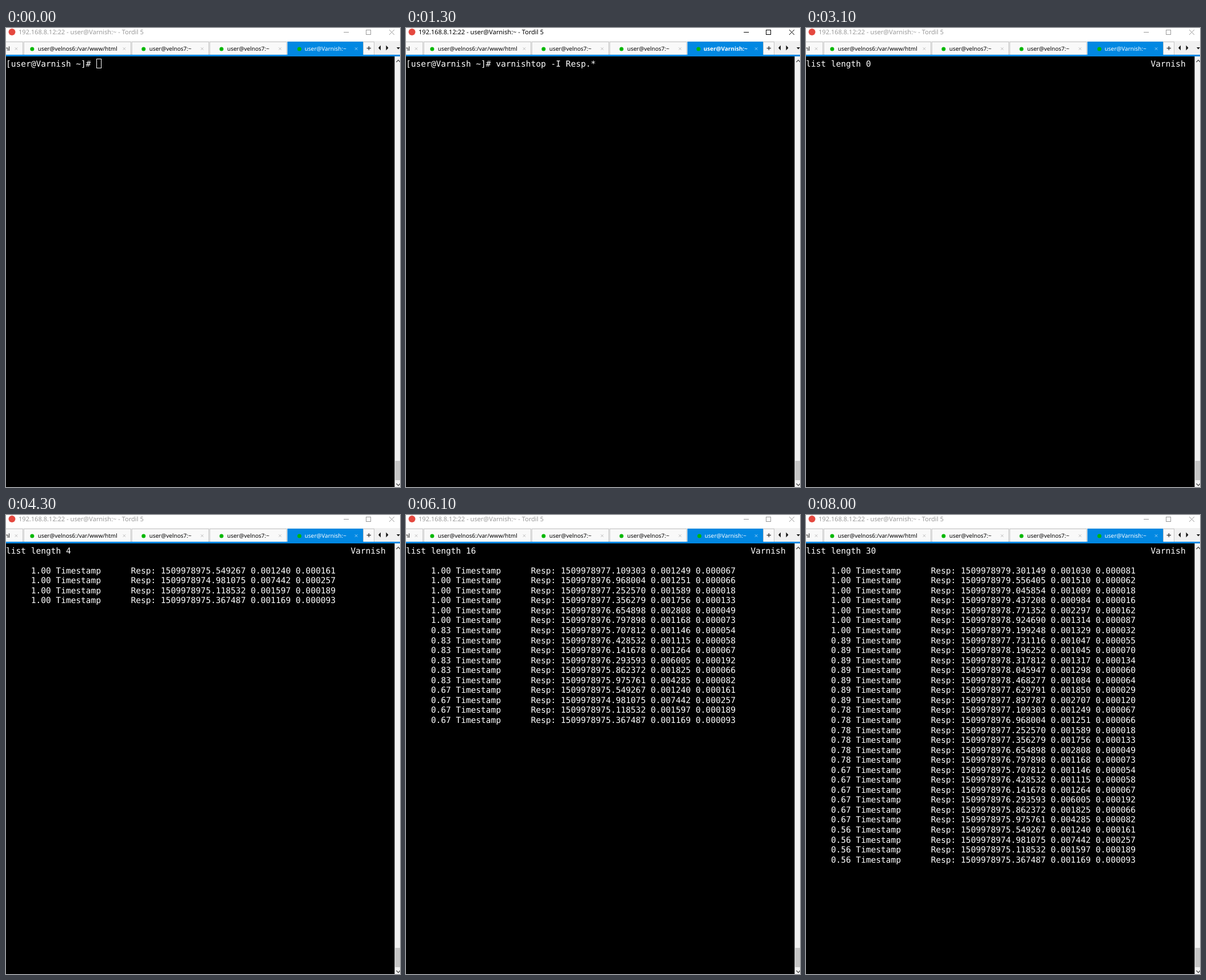
An HTML page with a canvas for the animation above (8.7 s loop, 693 by 808 pixels).

```html
<!DOCTYPE html>
<html lang="en">
<head>
<meta charset="utf-8">
<title>Terminal session</title>
<style>
  html, body { margin: 0; width: 100%; height: 100%; overflow: hidden; background: #000; }
  canvas { display: block; }
</style>
</head>
<body>
<canvas id="stage" width="693" height="808"></canvas>
<script>
const ctx = document.getElementById('stage').getContext('2d');
ctx.textRendering = 'geometricPrecision';

const LOOP = 8700;
const CELL = 8.785, LINE = 17.55, BASE = 67.6;
const UI = '"Noto Sans", sans-serif';
const MONO = '14.6px "DejaVu Sans Mono", monospace';
const BLUE = '#0288e2';
const PROMPT = '[user@Varnish ~]# ';

// Entries that arrive together: seconds, time since start, time since last.
const batches = [
  ['75.549267 1240 161', '74.981075 7442 257', '75.118532 1597 189', '75.367487 1169 93'],
  ['75.707812 1146 54', '76.428532 1115 58', '76.141678 1264 67',
   '76.293593 6005 192', '75.862372 1825 66', '75.975761 4285 82'],
  ['77.109303 1249 67', '76.968004 1251 66', '77.252570 1589 18',
   '77.356279 1756 133', '76.654898 2808 49', '76.797898 1168 73'],
  ['77.731116 1047 55', '78.196252 1045 70', '78.317812 1317 134', '78.045947 1298 60',
   '78.468277 1084 64', '77.629791 1850 29', '77.897787 2707 120'],
  ['79.301149 1030 81', '79.556405 1510 62', '79.045854 1009 18', '79.437208 984 16',
   '78.771352 2297 162', '78.924690 1314 87', '79.199248 1329 32']
];
const arrivals = [4300, 5200, 6100, 7100, 8000];

function rect(x, y, w, h, color) {
  ctx.fillStyle = color;
  ctx.fillRect(x, y, w, h);
}

function label(text, x, y, font, color, align = 'left') {
  ctx.font = font;
  ctx.fillStyle = color;
  ctx.textAlign = align;
  ctx.fillText(text, x, y);
}

function dot(x, y, r, color) {
  ctx.fillStyle = color;
  ctx.beginPath();
  ctx.arc(x, y, r, 0, 2 * Math.PI);
  ctx.fill();
}

function line(points, color, width = 1) {
  ctx.strokeStyle = color;
  ctx.lineWidth = width;
  ctx.beginPath();
  points.forEach(([x, y]) => ctx.lineTo(x, y));
  ctx.stroke();
}

function triangle(points, color) {
  ctx.fillStyle = color;
  ctx.beginPath();
  points.forEach(([x, y]) => ctx.lineTo(x, y));
  ctx.fill();
}

function cross(x, y, r, color, width) {
  line([[x - r, y - r], [x + r, y + r]], color, width);
  line([[x + r, y - r], [x - r, y + r]], color, width);
}

function termText(text, col, row) {
  ctx.font = MONO;
  ctx.fillStyle = '#fff';
  ctx.textAlign = 'left';
  [...text].forEach((ch, i) => {
    if (ch !== ' ') ctx.fillText(ch, (col + i) * CELL, BASE + row * LINE);
  });
}

function titleBar(focused) {
  const ink = focused ? '#000' : '#999';
  rect(0, 0, 693, 23, '#fff');
  dot(10.5, 7, 6, '#e5483f');
  label('192.168.8.12:22 - user@Varnish:~ - Tordil 5', 22, 11.3, '11.1px ' + UI, ink);
  line([[594, 7.5], [603, 7.5]], ink);
  ctx.strokeStyle = ink;
  ctx.strokeRect(633.5, 3.5, 8, 8);
  cross(678.5, 7.5, 4.5, ink, 1);
}

function tab(x, right, text, textX) {
  rect(x, 24, right - x, 23, '#c6c6c6');
  rect(x + 1, 25, right - x - 2, 22, '#f9f9f9');
  label(text, textX, 40.3, '10px ' + UI, '#000');
  if (x >= 0) dot(textX - 10, 37, 3.5, '#00b800');
  cross(right - 12, 36.5, 2.2, '#b5b5b5', 0.9);
}

function tabBar(bold) {
  rect(0, 23, 693, 24, '#f0f0f0');
  tab(-2, 30, 'ml', -5);
  tab(31, 220, 'user@velnos6:/var/www/html', 56);
  tab(221, 357, 'user@velnos7:~', 252);
  tab(358, 494, 'user@velnos7:~', 389);

  rect(495, 24, 133, 23, BLUE);
  dot(bold ? 514.5 : 516, 37, 3.5, '#00b800');
  label('user@Varnish:~', 562, 40.3, (bold ? 'bold ' : '') + '10px ' + UI, '#fff', 'center');
  cross(616, 36.5, 2.2, '#a9d6f7', 0.9);

  rect(628, 24, 20, 23, '#c6c6c6');
  rect(629, 25, 18, 22, '#f9f9f9');
  line([[634.5, 35.5], [642, 35.5]], '#222', 1.2);
  line([[638.3, 32], [638.3, 39]], '#222', 1.2);
  triangle([[659, 30.5], [659, 39.5], [655, 35]], '#111');
  triangle([[668.5, 30.5], [668.5, 39.5], [672.5, 35]], '#111');
  triangle([[687, 34], [693, 34], [690, 37.5]], '#111');
  rect(0, 47, 693, 3, BLUE);
}

function scrollBar() {
  rect(683.5, 50, 9.5, 758, '#f0f0f0');
  rect(684.5, 762, 8.5, 34, '#c6c6c6');
  line([[686.5, 60], [690, 56.5], [693.5, 60]], '#505050', 1.4);
  line([[686.5, 802], [690, 805.5], [693.5, 802]], '#505050', 1.4);
}

function entry(data, weight) {
  const [time, total, last] = data.split(' ');
  const micro = n => '0.' + n.padStart(6, '0');
  return `${weight.toFixed(2)} Timestamp      Resp: 15099789${time} ${micro(total)} ${micro(last)}`;
}

function hitList(t) {
  const latest = arrivals.filter(a => t >= a).length - 1;
  let count = 0;
  for (let i = latest; i >= 0; i--) {
    // Older batches decay linearly, more slowly as the run goes on.
    const weight = 1 - (latest - i) * 2 / (6 + 3 * latest);
    for (const data of batches[i]) termText(entry(data, weight), 5, 2 + count++);
  }
  termText('list length ' + count, 0, 0);
  termText('Varnish', 69, 0);
}

function terminal(t) {
  rect(0, 50, 684, 758, '#000');
  if (t >= 2500) return hitList(t);
  termText(PROMPT, 0, 0);
  if (t >= 1300) {
    termText('varnishtop -I Resp.*', PROMPT.length, 0);
  } else {
    ctx.strokeStyle = '#fff';
    ctx.lineWidth = 1;
    ctx.strokeRect(159.5, 54.5, 8, 16);
  }
}

function draw(now) {
  const t = now % LOOP;
  titleBar(t >= 700 && t < 3100);
  tabBar(t >= 800 && t < 3100);
  terminal(t);
  scrollBar();
}

const start = performance.now();
function tick() {
  draw(performance.now() - start);
  requestAnimationFrame(tick);
}
tick();
</script>
</body>
</html>
```
